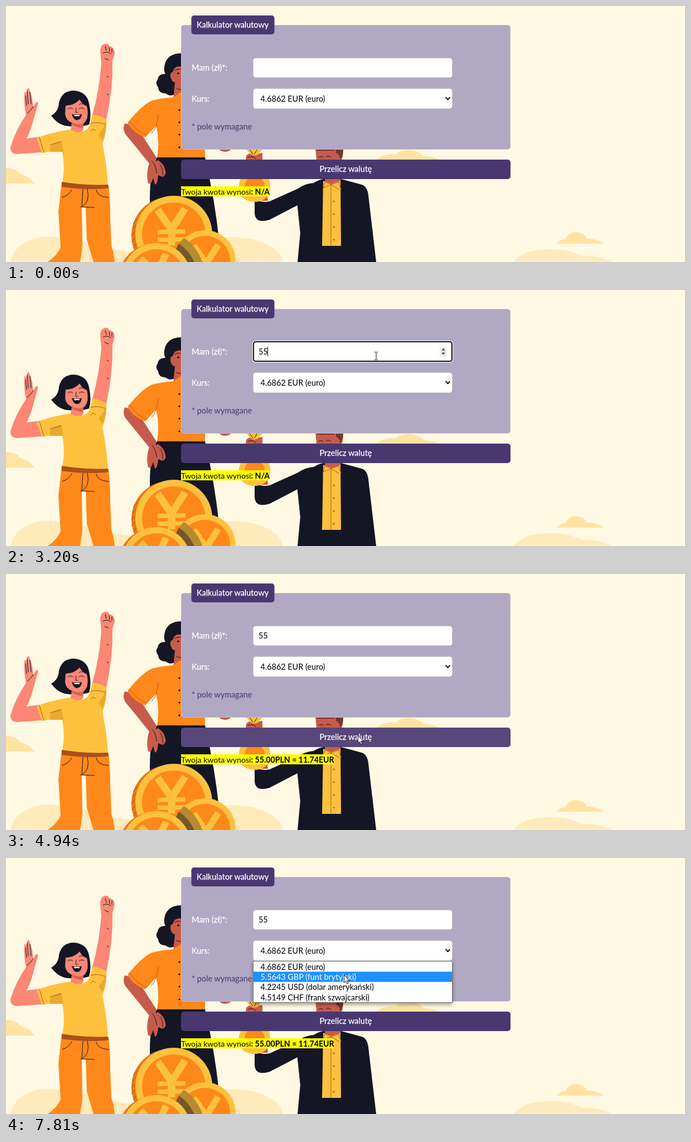
An HTML page for the animation above (8000 ms loop, 1218 by 460 pixels).

```html
<!DOCTYPE html>
<html lang="pl">
<head>
<meta charset="utf-8">
<title>Kalkulator walutowy</title>
<style>
html, body { margin: 0; width: 100%; height: 100%; overflow: hidden; background: #fff9e3; }
svg { display: block; width: 1218px; height: 460px; }
text { font: 14.4px Lato, sans-serif; fill: #000; white-space: pre; }
.sum { font-size: 14.15px; }
.bold { font-weight: 700; }
.white { fill: #fff; stroke: #fff; stroke-width: .25; }
.cloud { fill: #fee3a3; }
.hill { fill: #feeabb; }
.skin { fill: #fb8774; }
.tan { fill: #c75b4b; }
.gold { fill: #fdc13e; }
.orange { fill: #fe881a; }
.dark { fill: #141624; }
.shade { fill: #e9a92f; }
.line { fill: none; stroke: #141624; stroke-width: 1; stroke-linecap: round; }
.thin { fill: none; stroke: #b9571c; stroke-width: 1; stroke-linecap: round; }
.yen { fill: none; stroke: #fdc13e; }
</style>
</head>
<body>
<svg viewBox="0 0 1218 460">
  <defs>
    <g id="yen" class="yen">
      <path d="M-25-39 0-3 24-41M0-5V25" stroke-width="13"/>
      <path d="M-25 1 25 0M-25 15 25 14" stroke-width="8"/>
    </g>
    <clipPath id="coin"><circle cx="357" cy="458" r="56"/></clipPath>
    <filter id="shadow" x="-10%" y="-30%" width="120%" height="170%">
      <feDropShadow dx="0" dy="3" stdDeviation="3.5" flood-opacity=".4"/>
    </filter>
  </defs>
  <rect width="1218" height="460" fill="#fff9e3"/>

  <g class="hill">
    <path d="M8 460Q14 431 46 420Q66 411 96 417Q150 422 180 438Q215 438 240 446V460Z"/>
    <path d="M375 419Q425 409 462 426Q492 438 497 460H375Z"/>
    <path d="M911 460Q925 438 973 437Q1010 437 1030 448Q1068 449 1087 460Z"/>
  </g>
  <g class="cloud">
    <path d="M0 291Q18 291 27 303Q40 304 51 319H0Z"/>
    <path d="M664 276Q674 266 700 266Q711 257 727 259Q744 262 750 270Q768 270 778 277Z"/>
    <path d="M988 427Q991 420 1003 419Q1010 406 1023 406Q1037 407 1042 418Q1060 418 1073 427Z"/>
  </g>

  <!-- woman with curly hair -->
  <g>
    <path class="dark" d="M314 85Q291 85 285 104Q282 116 286 122Q274 121 272 132Q267 139 273 146Q274 157 286 157Q296 165 306 156L314 150Z"/>
    <path class="tan" d="M314 109Q302 106 299 119Q294 118 295 128Q298 137 303 137L300 168H314Z"/>
    <path class="line" d="M303 116Q308 112 313 114M306 148Q310 151 314 150"/>
    <circle cx="309" cy="121" r="1.6"/>
    <path class="tan" d="M213 211Q207 224 219 236L257 283Q251 300 255 318Q260 323 264 309L267 321Q272 320 273 304L281 307Q288 304 286 296Q283 283 273 277L246 235 262 222Z"/>
    <path class="orange" d="M300 164Q275 166 262 170Q245 177 218 210Q228 228 250 236L269 215Q276 240 271 272H357V200L314 154Z"/>
    <path class="thin" d="M273 195Q272 218 261 229M222 207Q233 225 252 232"/>
    <path class="dark" d="M271 272H357Q375 350 382 420V460H258V345Q258 300 271 272Z"/>
    <path class="tan" d="M257 283Q251 300 255 318Q260 323 264 309L267 321Q272 320 273 304L281 307Q288 304 286 296Q283 283 273 277Z"/>
    <path class="line" d="M262 279Q270 287 270 300M276 285Q282 291 281 304"/>
    <circle cx="311" cy="187" r="1.5"/><circle cx="311" cy="209" r="1.5"/>
    <circle cx="311" cy="231" r="1.5"/><circle cx="311" cy="254" r="1.5"/>
    <ellipse class="tan" cx="393" cy="257" rx="10" ry="5"/>
  </g>

  <!-- cheering woman -->
  <g>
    <path class="skin" d="M33 160Q33 151 36 157L38 149Q42 146 43 153L47 165 49 181 54 173Q59 171 57 178L51 198Q46 220 37 238L60 235 64 263 19 266Q5 265 9 251Q18 222 36 196Q32 180 33 160Z"/>
    <path class="line" d="M38 153L40 176M43 155L45 176M35 161L37 179M38 193Q45 187 49 181" stroke-width=".7"/>
    <path class="skin" d="M154 199Q168 150 171 103L169 83Q169 69 178 68Q183 67 185 72Q194 73 195 84L191 99Q192 150 180 204Z"/>
    <path class="line" d="M174 85Q181 80 188 86M178 73L180 80M185 75L186 82M190 77L190 84M177 94L184 97M181 158L184 160M181 126L184 128"/>
    <path class="dark" d="M81 197Q94 190 95 174Q100 152 122 152Q145 154 149 175Q154 198 149 213Q131 219 105 215Q91 211 81 197Z"/>
    <path class="skin" d="M107 179Q124 178 132 168Q136 176 145 180Q150 203 139 211Q138 216 139 222Q130 234 116 223L118 210Q107 205 106 194Z"/>
    <path d="M118 209Q129 215 139 211L138 219Q126 219 118 213Z" fill="#d66658"/>
    <path class="line" d="M110 178Q115 174 119 177M131 177Q136 174 140 177M111 185Q116 181 120 185M131 185Q136 181 140 185M126 183L125 191Q127 192 129 191"/>
    <path class="dark" d="M118 194Q127 197 136 194Q135 205 127 205Q120 204 118 194Z"/>
    <path d="M121 196H133L131 198H123Z" fill="#fff"/>
    <path class="gold" d="M55 237Q85 226 116 222Q130 232 146 221Q151 215 155 195Q168 196 180 204Q181 228 173 247Q181 285 183 324Q140 323 101 317Q107 290 100 258L64 264Z"/>
    <path class="shade" d="M79 249L99 242 103 262 79 262ZM166 231Q176 220 180 205Q180 228 173 242Z"/>
    <path class="thin" d="M60 236L68 263M81 249L99 244M152 211Q166 207 178 213M152 225Q157 218 160 224"/>
    <path class="orange" d="M100 316Q140 323 184 322Q187 350 187 380L189 432Q193 440 195 460H157L145 420 143 362H136L137 432 133 460H75Q92 448 98 434L94 370Z"/>
    <path d="M100 316Q140 323 183 321L184 327Q150 332 100 325Z" fill="#a9501b"/>
    <path class="line" d="M138 329L136 361M146 329Q151 352 138 359M101 344Q113 340 118 330M162 331Q164 343 184 344M134 361L159 362"/>
  </g>

  <!-- man with a money bag -->
  <g>
    <path class="tan" d="M431 269Q438 262 449 266L460 264V277L470 350H445V277H430Z"/>
    <path class="gold" d="M431 258H459L452 267Q444 271 439 266Z"/>
    <path class="line" d="M437 258L443 266M450 258L446 266M434 272Q441 268 448 274"/>
    <path class="dark" d="M446 347Q458 354 473 351L524 328Q536 319 552 318Q561 312 570 311H601Q620 316 638 321Q648 324 650 340L664 460H523L528 406 523 358 473 384Q447 392 446 372Z"/>
    <path class="gold" d="M437 277H455Q475 306 474 328Q470 352 445 352Q419 350 417 327Q419 306 437 277Z"/>
    <circle class="orange" cx="446" cy="324" r="18"/>
    <path class="tan" d="M555 256H604Q606 267 602 277L600 318 585 327 572 316V277H557Z"/>
    <path d="M592 256H605Q605 270 599 276Q599 266 592 264ZM555 256H594L588 260H558Z" fill="#70372f"/>
    <path class="line" d="M561 272Q565 269 569 272M574 271Q578 268 583 272" stroke-width="1.7"/>
    <path class="gold" d="M569 314L584 320 600 314 601 431H567Z"/>
    <path class="thin" d="M568 331L572 316 584 321 597 316 601 330M583 321V430M569 327L583 321 598 330"/>
    <g fill="#b9571c"><circle cx="588" cy="351" r="1.5"/><circle cx="588" cy="374" r="1.5"/><circle cx="588" cy="397" r="1.5"/><circle cx="588" cy="420" r="1.5"/></g>
    <path d="M523 358L528 406" stroke="#30334a" fill="none"/>
  </g>

  <!-- coins -->
  <g>
    <circle cx="294" cy="412" r="69" fill="#e97813"/>
    <path d="M228 391L236 382M226 402L234 393M225 413L233 404M225 424L233 415M228 435L235 426" stroke="#ad5518" fill="none"/>
    <circle class="gold" cx="301" cy="410" r="69"/>
    <circle class="orange" cx="301" cy="410" r="57"/>
    <use href="#yen" x="297" y="405"/>
    <circle class="gold" cx="357" cy="458" r="55"/>
    <circle class="orange" cx="357" cy="458" r="45"/>
    <use href="#yen" transform="translate(359 466) scale(.9)"/>
    <g clip-path="url(#coin)">
      <circle cx="270" cy="488" r="87" fill="#b78b30"/>
      <circle cx="270" cy="488" r="73" fill="#765729"/>
    </g>
    <circle cx="264" cy="490" r="62" fill="#e97813"/>
    <circle class="gold" cx="270" cy="488" r="62"/>
    <circle class="orange" cx="270" cy="488" r="51"/>
    <use href="#yen" transform="translate(270 487) rotate(-8) scale(.95)"/>
  </g>

  <!-- form -->
  <rect x="314.5" y="34.5" width="590" height="223" rx="4.5" fill="#b1a8c3" stroke="#c5c0cc"/>
  <rect x="332.500" y="17" width="149" height="34" rx="5" fill="#493870"/>
  <text class="white" x="342" y="39">Kalkulator walutowy</text>
  <text class="white" x="333" y="116">Mam (zł)*:</text>
  <text class="white" x="333" y="172">Kurs:</text>
  <text x="333" y="222" style="fill:#493870">* pole wymagane</text>
  <rect x="443.5" y="93.5" width="357" height="35" rx="4.5" fill="#fff" stroke="#ccc"/>
  <g id="focus">
    <rect x="442" y="91" width="360" height="39" rx="6" fill="#fff"/>
    <rect x="444" y="93" width="356" height="35" rx="4" fill="#fff" stroke="#101010" stroke-width="2"/>
  </g>
  <g id="spin">
    <rect x="778" y="102" width="13" height="17" fill="#efefef"/>
    <path d="M781 108.5L784.5 104.5 788 108.5ZM781 112.5L784.5 116.5 788 112.5Z" fill="#505050"/>
  </g>
  <text id="amount" x="453" y="116"></text>
  <rect id="caret" y="102" width="1" height="17"/>
  <rect x="443.5" y="148.5" width="357" height="36" rx="4.5" fill="#fff" stroke="#ccc"/>
  <text x="456.5" y="172">4.6862 EUR (euro)</text>
  <path d="M788.5 164L792.5 168 796.5 164" fill="none" stroke="#111" stroke-width="2"/>
  <rect id="button" x="314" y="276" width="591" height="35" rx="5"/>
  <text class="white" x="609.5" y="298" text-anchor="middle">Przelicz walutę</text>
  <rect id="mark" x="314" y="324" height="18" fill="#ff0"/>
  <text class="sum" x="314" y="339">Twoja kwota wynosi<tspan id="result" class="bold"></tspan></text>

  <g id="list">
    <rect x="443.5" y="185.5" width="357" height="74" fill="#fff" stroke="#777" filter="url(#shadow)"/>
    <rect id="pick" x="444" width="356" height="18.3"/>
    <g id="options"></g>
  </g>

  <g id="pointer">
    <circle id="click" r="11" fill="#ffee00" fill-opacity=".55"/>
    <path id="arrow" d="M.5.5V14L3.6 11.2 5.7 16.3 7.9 15.4 5.8 10.3H9.8Z" fill="#fff" stroke="#111" stroke-width=".9"/>
    <path id="beam" d="M-3-6.5H-1L0-5.5 1-6.5H3M0-5.5V6.5M-3 7.5H-1L0 6.5 1 7.5H3" fill="none" stroke="#111"/>
  </g>
</svg>
<script>
const LOOP = 8000;
const ROW = 18.3;
const $ = id => document.getElementById(id);
const rates = ["4.6862 EUR (euro)", "5.5643 GBP (funt brytyjski)",
  "4.2245 USD (dolar amerykański)", "4.5149 CHF (frank szwajcarski)"];
const rowY = i => 186 + i * ROW;

const options = rates.map((label, i) => {
  const row = document.createElementNS("http://www.w3.org/2000/svg", "text");
  row.setAttribute("x", 456.5);
  row.setAttribute("y", Math.round(rowY(i) + 14.6));
  row.textContent = label;
  $("options").append(row);
  return row;
});
$("pick").setAttribute("fill", "#1e90ff");

// start, end, steps, from x, from y, to x, to y
const moves = [
  [920, 1040, 3, 1006, 388, 810, 240],
  [1310, 1920, 9, 737, 188, 664, 118],
  [3750, 4540, 12, 664, 118, 631, 290],
  [5540, 5740, 4, 632, 275, 634, 170],
  [6030, 6210, 4, 628, 159, 620, 145],
  [6490, 6770, 5, 621, 147, 626, 160],
  [7170, 7810, 10, 626, 160, 606, 210]
];

const within = (t, a, b) => t >= a && t < b;
const show = (id, on) => $(id).style.display = on ? "" : "none";
const smooth = f => f * f * (3 - 2 * f);

function pointerAt(t) {
  const move = moves.findLast(m => t >= m[0]);
  if (!move) return null;
  const [start, end, steps, x0, y0, x1, y1] = move;
  const last = steps - 1;
  const step = Math.min(last, Math.floor((t - start) / (end - start) * last + 1e-6));
  const f = smooth(step / last);
  return [Math.round(x0 + (x1 - x0) * f), Math.round(y0 + (y1 - y0) * f)];
}

function draw(t) {
  const pos = pointerAt(t);
  const [x, y] = pos || [0, 0];
  const overInput = within(y, 93, 130) && within(x, 443, 802);
  const overButton = within(y, 276, 311) && within(x, 314, 905);
  const focused = within(t, 2200, 4870);
  const typed = t < 3070 ? "" : t < 3200 ? "5" : "55";
  const done = t >= 4870;

  show("pointer", pos);
  $("pointer").setAttribute("transform", `translate(${x} ${y})`);
  show("arrow", !overInput);
  show("beam", overInput);
  show("click", within(t, 2200, 2330) || within(t, 4740, 4940) || within(t, 7020, 7170));

  show("focus", focused);
  show("spin", focused || overInput);
  $("amount").textContent = typed;
  show("caret", within(t, 2200, 2720) || within(t, 3070, 3750) || within(t, 4250, 4740));
  $("caret").setAttribute("x", 453 + typed.length * 8);
  $("button").setAttribute("fill", overButton ? "#57477b" : "#493870");

  $("result").textContent = done ? ": 55.00PLN = 11.74EUR" : ": N/A";
  $("mark").setAttribute("width", done ? 274 : 158);

  show("list", t >= 7020);
  const picked = Math.max(0, Math.min(3, Math.floor((y - 186) / ROW)));
  $("pick").setAttribute("y", rowY(picked));
  options.forEach((row, i) => row.style.fill = i === picked ? "#fff" : "#000");
}

const begin = performance.now();
function tick() {
  draw((performance.now() - begin) % LOOP);
  requestAnimationFrame(tick);
}
draw(0);
requestAnimationFrame(tick);
</script>
</body>
</html>
```
